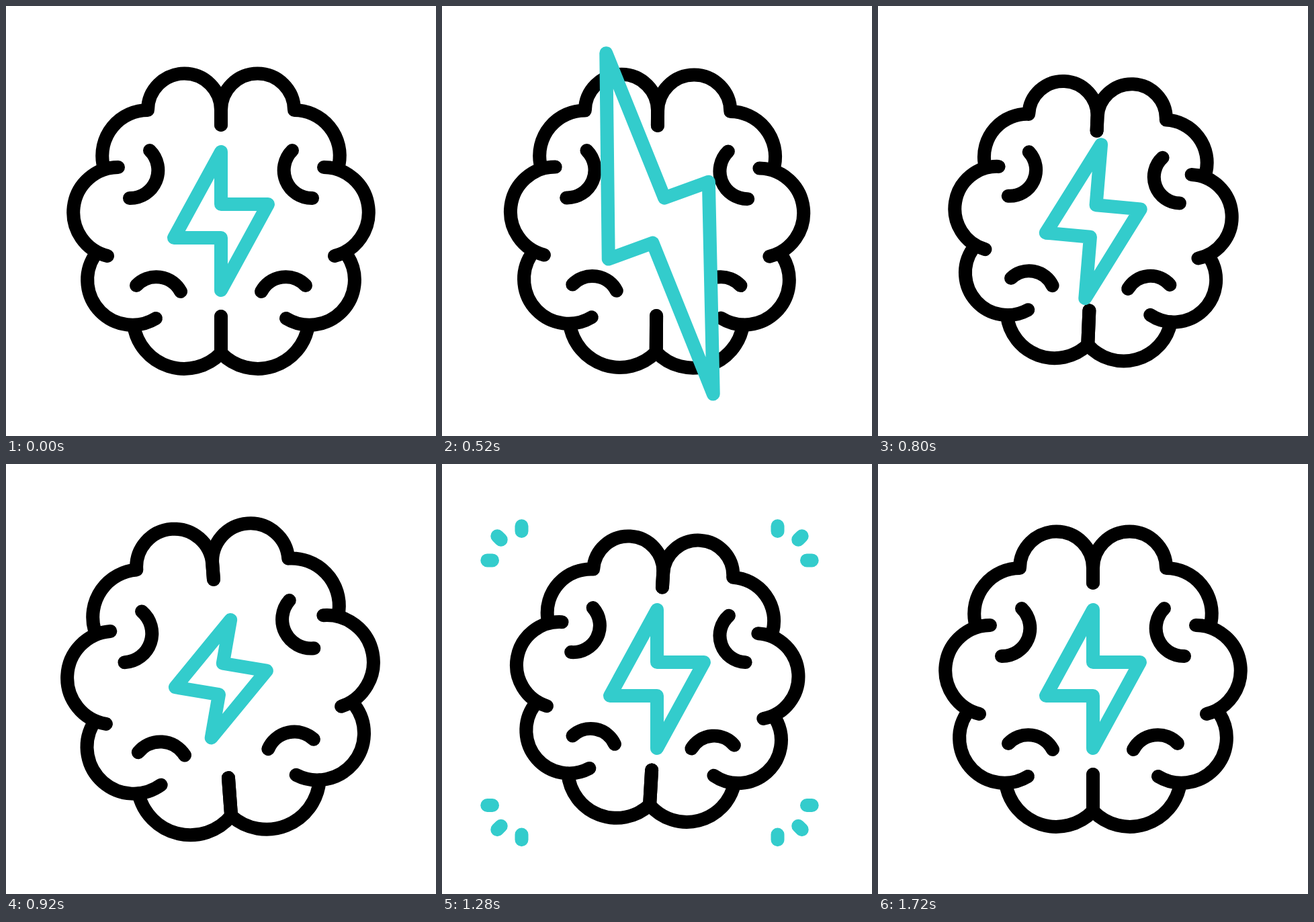
These frames come from a looping animation (640 by 640 pixels, 2040 ms). An HTML page:

```html
<!DOCTYPE html>
<html lang="en">
<head>
<meta charset="utf-8">
<title>Brainstorm</title>
<style>
  html, body { margin: 0; width: 100%; height: 100%; overflow: hidden; background: #fff; }
  svg { display: block; width: 100%; height: 100%; }
  svg > * { fill: none; stroke: #3cc; stroke-width: 20; stroke-linecap: round; stroke-linejoin: round; }
  #brain { stroke: #000; }
  #bolt { fill: #fff; }
</style>
</head>
<body>
<svg viewBox="-320 -320 640 640">
  <g id="brain">
    <g id="half" transform="translate(-320 -320)">
      <path d="M320 177V155A54.5 54.5 0 0 0 211 155A68 68 0 0 0 144.5 236"/>
      <path d="M167 240A67 67 0 0 0 151 372"/>
      <path d="M131.5 372A67 67 0 0 0 223 465"/>
      <path d="M190 475A76 76 0 0 0 320 516.5V462"/>
      <path d="M214 215A41.5 41.5 0 0 1 184 286"/>
      <path d="M194 416A41 41 0 0 1 260 425"/>
    </g>
    <use href="#half" transform="scale(-1 1)"/>
  </g>
  <polygon id="bolt"/>
  <path id="rays"/>
</svg>
<script>
const FRAME_MS = 40, FRAMES = 51, STROKE = 20;
const [brain, bolt, rays] = ["brain", "bolt", "rays"].map(id => document.getElementById(id));

function ease(frame, from, to) {
  const t = Math.min(1, Math.max(0, (frame - from) / (to - from)));
  return t * t * (3 - 2 * t);
}

// Eases through [frame, value] keys.
function tween(frame, ...keys) {
  return keys.reduce(([from, value], [to, next]) =>
    [to, value + (next - value) * ease(frame, from, to)])[1];
}

// The brain wobbles through evenly spaced poses.
function wobble(frame, ...values) {
  return tween(frame, ...values.map((value, i) => [12 + 6 * i, value]));
}

// Turns and scales a shape but keeps its line weight.
function pose(shape, angle, scale) {
  shape.setAttribute("transform", `rotate(${angle}) scale(${scale})`);
  shape.style.strokeWidth = STROKE / scale;
}

// Each half of the bolt is a tip, an inner corner and an outer corner.
function boltPoints(stretch) {
  return [-1, 1].flatMap(side => {
    const tip = 103 + (165 + 5 * side) * stretch;
    const inner = 20 * stretch, level = 25 + 3.5 * stretch;
    return [[12 * stretch, tip], [inner, level], [inner + 70, level]]
      .map(([x, y]) => [2.5 * stretch - side * x, side * y]);
  }).join(" ");
}

// Three rays fan out at each corner, the tail chasing the head.
function rayPath(frame) {
  if (frame <= 30 || frame >= 42) return "";
  const reach = (from, to) => 43.5 + 56 * ease(frame, from, to);
  const tail = reach(33.4, 42), head = reach(30, 38.6);
  let path = "";
  for (const sx of [-1, 1]) for (const sy of [-1, 1]) for (let i = 0; i < 3; i++) {
    const angle = i * Math.PI / 4;
    const at = r => [-11 + sx * (190.5 + r * Math.cos(angle)), 5.7 + sy * (182.3 + r * Math.sin(angle))];
    path += `M${at(tail)}L${at(head)}`;
  }
  return path;
}

function draw(time) {
  const frame = Math.floor(time / FRAME_MS) % FRAMES;
  pose(brain, wobble(frame, 0, 5, -5, 4.5, 0), wobble(frame, 1, 0.9, 1.05, 0.94, 1));
  pose(bolt,
    tween(frame, [0, 0], [11, -20], [14, -20], [22, 10], [30, 0]),
    tween(frame, [14, 1], [22, 0.94], [30, 1]));
  bolt.setAttribute("points", boltPoints(tween(frame, [0, 0], [14, 1], [22, -0.055], [30, 0])));
  rays.setAttribute("d", rayPath(frame));
}

const start = performance.now();
function tick() {
  draw(performance.now() - start);
  requestAnimationFrame(tick);
}
tick();
</script>
</body>
</html>
```
